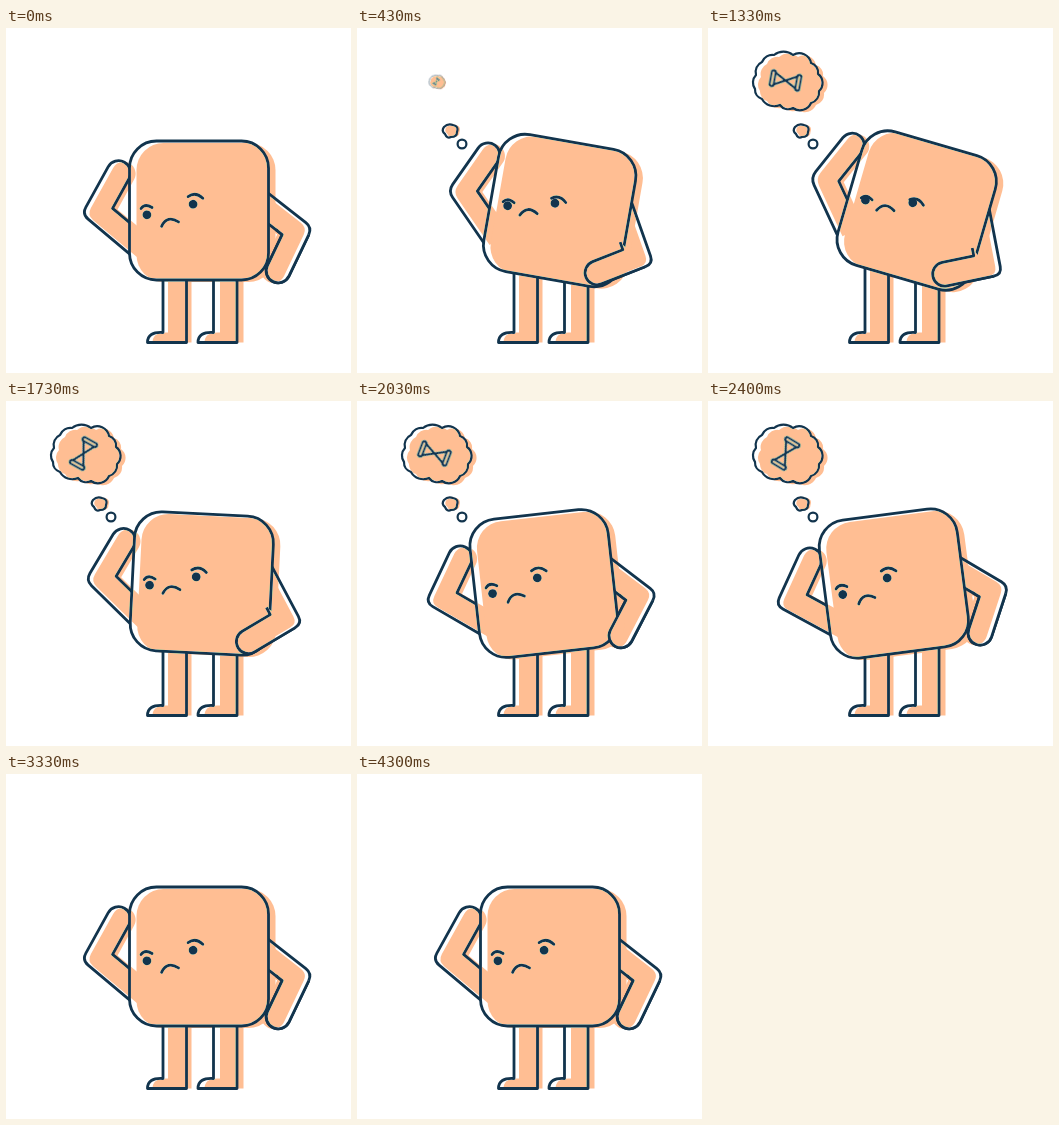
An HTML page that plays this animation: 345 by 345 pixels, repeating every 5.36 s.

```html
<!DOCTYPE html>
<html lang="en">
<head>
<meta charset="utf-8">
<title>Waiting box</title>
<style>
  html, body { margin: 0; width: 100%; height: 100%; overflow: hidden; background: #fff; }
  svg { display: block; width: 100vw; height: 100vh; }
  .tint { fill: #ffbe93; }
  .ink { fill: #fff; stroke: #12344d; stroke-width: 2.8; stroke-linejoin: round; mix-blend-mode: darken; }
  .fine { stroke-width: 2.2; }
  .open { fill: none; stroke-linecap: round; }
  .dot { fill: #12344d; stroke: none; }

  .cloud, .mid, .small, .glass { animation: 5360ms linear infinite; }
  .cloud { transform-origin: 80px 54px; animation-name: cloud; }
  .mid { transform-origin: 93px 103px; animation-name: mid; }
  .small { transform-origin: 105px 116px; animation-name: small; }
  .glass { transform-origin: 77.5px 52.5px; animation-name: spin; }

  @keyframes cloud {
    0%, 7.1% { transform: scale(0); }
    8.02% { transform: scale(.22); }
    9.9% { transform: scale(1); }
    11.2% { transform: scale(1.04); }
    13%, 55.9% { transform: scale(1); }
    58.4%, 100% { transform: scale(0); }
  }
  @keyframes mid {
    0%, 3.7% { transform: scale(0); }
    6.2%, 57.8% { transform: scale(1); }
    60.1%, 100% { transform: scale(0); }
  }
  @keyframes small {
    0%, 1.9% { transform: scale(0); }
    3.7%, 59.7% { transform: scale(1); }
    61.9%, 100% { transform: scale(0); }
  }
  @keyframes spin {
    0%, 5.6% { transform: rotate(0deg); }
    55%, 100% { transform: rotate(720deg); }
  }
</style>
</head>
<body>
<svg viewBox="0 0 345 345">
  <defs>
    <path id="puff" d="M48 47A11 11 0 0 1 54 34A11 11 0 0 1 66 27A15 15 0 0 1 85 27A12 12 0 0 1 103 35A10 10 0 0 1 110 46A11 11 0 0 1 111 63A11 11 0 0 1 103 75A12 12 0 0 1 85 80A10 10 0 0 1 72 77A14 14 0 0 1 54 71A10 10 0 0 1 47 61A11 11 0 0 1 48 47Z"/>
    <path id="drop" d="M87 99Q91 95 96 97Q102 98 100 104Q100 109 94 109Q90 111 88 106Q84 103 87 99Z"/>
    <path id="leg" d="M157 230V304.5Q141.5 303.5 141.5 314.5H180.5V230"/>
    <rect id="box" x="-69.5" y="-69.5" width="139" height="139" rx="27"/>
  </defs>

  <g class="tint">
    <use href="#leg" x="5"/>
    <use href="#leg" x="57"/>
    <g transform="translate(5 1)"><g class="body"><path class="armL"/></g></g>
    <g transform="translate(-5 0)"><g class="body"><path class="armR"/></g></g>
    <g transform="translate(7 2)"><g class="body"><use href="#box"/></g></g>
    <g class="cloud"><use href="#puff" x="5" y="2"/></g>
    <g class="mid"><use href="#drop" x="2.5"/></g>
  </g>

  <g class="ink">
    <use href="#leg"/>
    <use href="#leg" x="50.5"/>
    <g class="body">
      <path class="armL"/>
      <path class="armR"/>
      <use href="#box"/>
      <g transform="translate(-29 -1) rotate(-13)">
        <circle class="dot" cx="-23.7" r="4.4"/>
        <circle class="dot" cx="23.7" r="4.4"/>
        <path class="open" id="mouth" d="M-12 14.5Q-4 4.5 5.5 14"/>
        <path class="open" id="brows" d="M-28 -7.5Q-23 -12 -17 -6M20.5 -8.5Q29 -12 34.5 -3.5"/>
      </g>
      <path id="hand"/>
    </g>
    <g class="fine">
      <g class="cloud">
        <use href="#puff"/>
        <g class="glass">
          <path class="open" transform="translate(77.5 52.5)"
            d="M-7 -15H7Q9 -13 7 -11H-7Q-9 -13 -7 -15ZM-7 15H7Q9 13 7 11H-7Q-9 13 -7 15ZM-6 -11L6 11M6 -11L-6 11"/>
        </g>
      </g>
      <g class="mid"><use href="#drop"/></g>
      <circle class="small" cx="105" cy="116" r="4.4"/>
    </g>
  </g>
</svg>

<script>
const LOOP = 5360, R = 12, BONE = 44;

const set = (selector, name, value) =>
  document.querySelectorAll(selector).forEach(el => el.setAttribute(name, value));

const clamp = u => Math.min(1, Math.max(0, u));
const easeOut = u => Math.sin(clamp(u) * Math.PI / 2);
const smooth = u => (1 - Math.cos(clamp(u) * Math.PI)) / 2;

// Outline of a bent arm from its shoulder and two bone angles: whole, and the forearm alone.
function limb(x, y, upper, lower) {
  const a = upper * Math.PI / 180, b = lower * Math.PI / 180;
  const side = Math.PI / 2, mid = (a + b) / 2 - side;
  const miter = R / Math.cos((b - a) / 2);
  const at = ([px, py], angle, d) => [px + Math.cos(angle) * d, py + Math.sin(angle) * d];

  const root = at([x, y], a, -12);
  const elbow = at([x, y], a, BONE), hand = at(elbow, b, BONE);
  const tip = at(elbow, mid, miter), inner = at(elbow, mid, -miter);
  const fore = `${at(tip, b, 8)}L${at(hand, b - side, R)}`
    + `A${R} ${R} 0 0 1 ${at(hand, b + side, R)}L${inner}`;
  return {
    whole: `M${at(root, a - side, R)}L${at(tip, a, -8)}Q${tip} ${fore}L${at(root, a + side, R)}`,
    fore: `M${fore}L${at(inner, a, -8)}`
  };
}

function draw(t) {
  // Lean forward, swing back past upright, then settle.
  const tilt = 18 * easeOut(t / 1150) - 26 * smooth((t - 1150) / 1050) + 8 * smooth((t - 2200) / 1130);
  // The front arm folds over the belly and opens again.
  const fold = easeOut(t / 600) - smooth((t - 1550) / 700);

  set('.body', 'transform', `translate(${193 + .97 * tilt} 182.5) rotate(${tilt})`);
  set('#brows', 'transform', `translate(0 ${Math.max(0, tilt) / 3})`);
  set('#mouth', 'transform', `translate(0 ${-5 * fold})`);

  set('.armL', 'd', limb(-68, 29, 220 + .55 * tilt, 299 - .4 * tilt).whole);
  const front = limb(63.5, -6.5, 38 + 25 * fold, 115.5 + 36.5 * fold);
  set('.armR', 'd', front.whole);
  set('#hand', 'd', front.fore);
}

let start;
function tick(now) {
  start ??= now;
  draw((now - start) % LOOP);
  requestAnimationFrame(tick);
}
draw(0);
requestAnimationFrame(tick);
</script>
</body>
</html>
```
